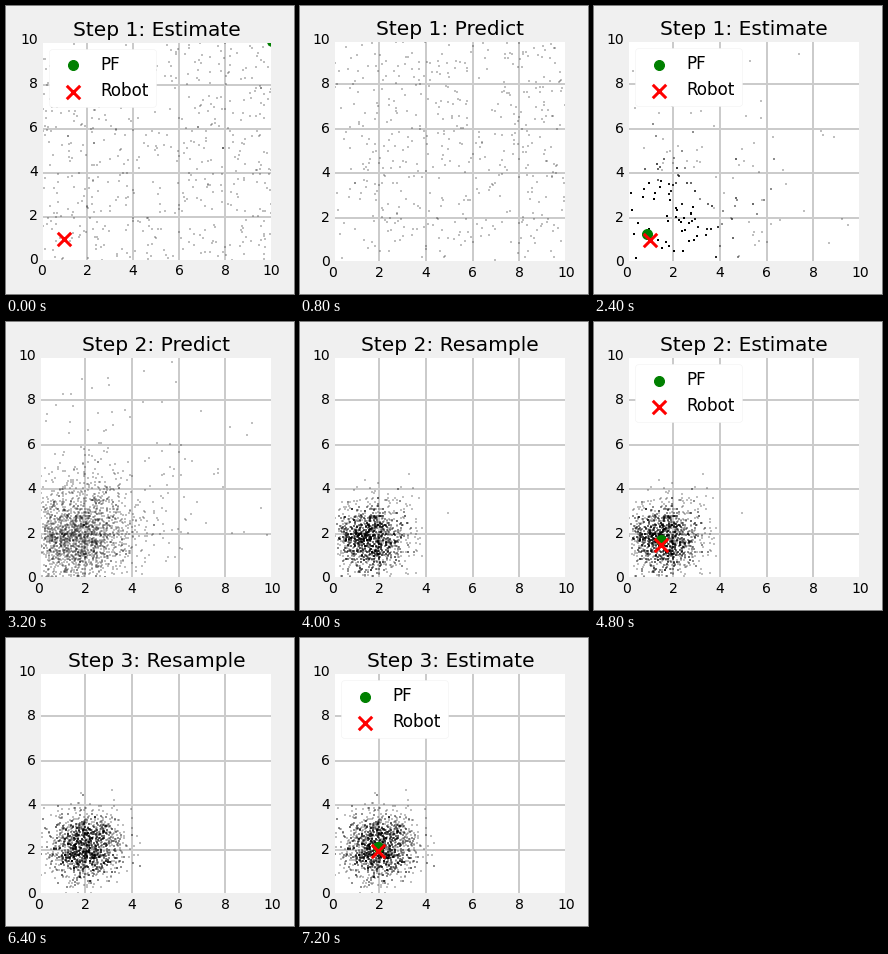
A matplotlib script that plays this animation: 288 by 288 pixels, repeating every 8 s.

```python
import numpy as np
import matplotlib.pyplot as plt
from matplotlib.animation import FuncAnimation

SIZE = 288
COUNT = 2200
BACK = "#f0f0f0"

plt.rcParams.update({
    "font.family": "DejaVu Sans",
    "font.size": 14,
    "figure.facecolor": BACK,
    "savefig.facecolor": BACK,
    "axes.facecolor": "white",
    "axes.edgecolor": BACK,
    "axes.linewidth": 3,
    "axes.axisbelow": True,
    "axes.grid": True,
    "grid.color": "#cbcbcb",
    "grid.linewidth": 2,
    "xtick.major.size": 0,
    "ytick.major.size": 0,
    "xtick.major.pad": 3.7,
    "ytick.major.pad": 2.7,
    "ytick.alignment": "center",
    "patch.linewidth": 0.5,
})

# Axes edges in pixels from the top left: left, top, right, bottom
FIRST_BOX = (35, 34.5, 265.6, 254.5)
BOX = (32.8, 33.9, 266, 256.1)

# Per step: measured position, spread, tail exponent, estimate, robot
STEPS = [
    ((0.9, 1.2), 0.5, 2, (0.87, 1.28), (1, 1)),
    ((1.5, 1.65), 0.95, 8, (1.45, 1.72), (1.47, 1.48)),
    ((2.0, 2.0), 0.95, 8, (1.95, 2.13), (1.93, 1.92)),
]


def predict(points, rng):
    return points + (0.42, 0.48) + rng.normal(0, 0.7, points.shape)


def resample(points, center, spread, tail, rng):
    dist2 = ((points - center) ** 2).sum(axis=1)
    weights = (1 + dist2 / (2 * tail * spread ** 2)) ** -tail
    picks = rng.choice(len(points), len(points), p=weights / weights.sum())
    return points[picks]


def run_filter():
    """Return (title, particles, estimate, robot) for every stage."""
    rng = np.random.default_rng(4)
    points = rng.uniform(0, 20, (COUNT, 2))
    stages = [("Step 1: Estimate", points, (10, 10), (1, 1))]
    for n, (center, spread, tail, mean, robot) in enumerate(STEPS, 1):
        points = predict(points, rng)
        stages.append((f"Step {n}: Predict", points, None, None))
        points = resample(points, center, spread, tail, rng)
        stages.append((f"Step {n}: Resample", points, None, None))
        stages.append((f"Step {n}: Estimate", points, mean, robot))
    return stages


def place_axes(left, top, right, bottom):
    ax.set_position([left / SIZE, 1 - bottom / SIZE,
                     (right - left) / SIZE, (bottom - top) / SIZE])


def draw_markers(mean, robot):
    ax.scatter(*mean, s=100, color="green", linewidths=1, label="PF", zorder=2)
    ax.scatter(*robot, s=180, marker="x", color="red", linewidths=3,
               label="Robot", zorder=2.1)
    ax.legend(loc="upper left", fontsize=16.8, scatterpoints=1, framealpha=1,
              edgecolor=BACK, handletextpad=0.65, labelspacing=0.5)


def draw(i):
    title, points, mean, robot = stages[i]
    ax.cla()
    place_axes(*(FIRST_BOX if i == 0 else BOX))
    ax.scatter(points[:, 0], points[:, 1], s=4, marker="s", color="black",
               alpha=0.25, linewidths=0)
    if mean is not None:
        draw_markers(mean, robot)
    ax.set(xlim=(0, 10), ylim=(0, 10),
           xticks=range(0, 11, 2), yticks=range(0, 11, 2))
    ax.set_title(title, fontsize=20.16, pad=5, x=0.504)


stages = run_filter()
fig = plt.figure(figsize=(4, 4), dpi=72)
ax = fig.add_axes([0.1, 0.1, 0.8, 0.8])
anim = FuncAnimation(fig, draw, frames=len(stages), init_func=lambda: None,
                     interval=800, repeat=True, repeat_delay=0)
plt.show()
```
